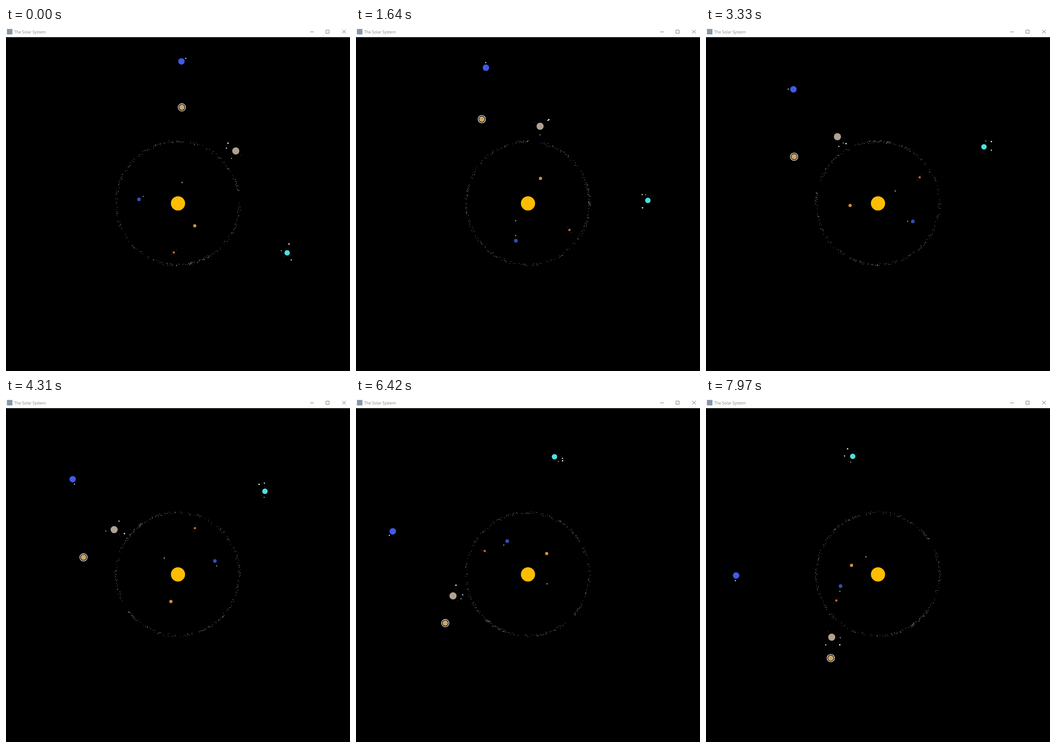
Recreate the animation shown at these times as an HTML page with a canvas. Size 750 by 747 pixels, loop 8000 ms.

```html
<!DOCTYPE html>
<html lang="en">
<head>
<meta charset="utf-8">
<title>The Solar System</title>
<style>
  html, body { margin: 0; width: 100%; height: 100%; overflow: hidden; background: #000; }
  canvas { display: block; }
</style>
</head>
<body>
<canvas id="stage" width="750" height="747"></canvas>
<script>
const ctx = document.getElementById('stage').getContext('2d');
const LOOP = 8000;
const STEP = 46.875;
const SUN = { x: 375, y: 382 };

// Moon fields: orbit radius, start angle, degrees per step, diameter, colour
const WHITE = '#fafafa', DIM = '#888';
const luna = [11.4, 34.5, 22.14, 2.1, '#e8e8e8'];
const planets = [
  { r: 46.4, start: 78.8, speed: 4.429, d: 3.4, color: '#7c7c7a' },
  { r: 61, start: -53.2, speed: 3.322, d: 7, color: '#cf9139' },
  { r: 85.5, start: 174.1, speed: 2.217, d: 8, color: '#3150b0', moons: [luna] },
  { r: 107.2, start: 265.1, speed: 1.775, d: 5, color: '#c96239', moons: [
    [7.6, 44, 17.71, 1, DIM],
    [7.6, 222, 17.71, 1, DIM]
  ] },
  { r: 170, start: 42.2, speed: 1.107, d: 15.5, color: '#b0a291', moons: [
    [24, 135, 17.71, 3.1, WHITE],
    [21.2, 163.5, 6.643, 2.5, WHITE],
    [18.6, 240.5, 11.08, 1.9, WHITE],
    [15.2, 320, 15.5, 1, DIM]
  ] },
  { r: 209.3, start: 87.7, speed: 0.884, d: 12, color: '#cca566', ring: 8.1 },
  { r: 262.1, start: -24.4, speed: 0.731, d: 11.8, color: '#4fdfe0', dx: -0.7, dy: -0.7, moons: [
    [19.8, 78.5, 4.43, 3, WHITE],
    [17.8, 299.5, 5.54, 2.6, WHITE],
    [13.2, 160, 8.857, 1.9, WHITE],
    [15.2, 163.5, 6.64, 1, DIM],
    [12, 230, 15.5, 1.1, DIM]
  ] },
  { r: 309.4, start: 88.6, speed: 0.5312, d: 14, color: '#4159ec',
    moons: [[...luna.slice(0, 3), 2.4, WHITE]] }
];

function seeded(seed) {
  return () => (seed = (seed * 16807) % 2147483647) / 2147483647;
}

function makeBelt() {
  const rnd = seeded(4711);
  const rocks = [];
  while (rocks.length < 300) {
    // A sparse stretch near 5 degrees, a crowded one near 290
    const u = rnd();
    const angle = u < 0.1 ? 278 + rnd() * 24 : rnd() * 360;
    const sparse = Math.abs(angle - 5) < 6;
    const rock = { angle, r: 131.5 + rnd() * 5.5, light: 0.4 + rnd() * 0.5 };
    if (!sparse) rocks.push(rock);
  }
  return rocks;
}
const belt = makeBelt();

function orbit(c, r, deg) {
  const a = deg * Math.PI / 180;
  return { x: c.x + r * Math.cos(a), y: c.y - r * Math.sin(a) };
}

function disc(p, d, color) {
  ctx.fillStyle = color;
  ctx.beginPath();
  ctx.arc(p.x, p.y, d / 2, 0, Math.PI * 2);
  ctx.fill();
}

function dot(p, color) {
  ctx.fillStyle = color;
  ctx.fillRect(Math.round(p.x - 0.5), Math.round(p.y - 0.5), 1, 1);
}

function drawPlanet(p, turn) {
  const pos = orbit({ x: SUN.x + (p.dx || 0), y: SUN.y + (p.dy || 0) }, p.r, p.start + p.speed * turn);
  disc(pos, p.d, p.color);
  if (p.ring) {
    ctx.strokeStyle = '#fff';
    ctx.lineWidth = 1.3;
    ctx.beginPath();
    ctx.arc(pos.x, pos.y, p.ring, 0, Math.PI * 2);
    ctx.stroke();
  }
  for (const [r, start, speed, d, color] of p.moons || []) {
    const m = orbit(pos, r, start + speed * turn);
    if (d < 1.5) dot(m, color);
    else disc(m, d, color);
  }
}

function drawTitleBar() {
  ctx.fillStyle = '#fffffd';
  ctx.fillRect(0, 0, 750, 20);
  ctx.fillStyle = '#8699ac';
  ctx.fillRect(2, 2, 12, 12);
  ctx.fillStyle = '#858585';
  ctx.font = '8.6px "Open Sans", "Noto Sans", sans-serif';
  ctx.textBaseline = 'alphabetic';
  ctx.fillText('The Solar System', 18, 11.5);
  ctx.strokeStyle = '#777';
  ctx.lineWidth = 1;
  ctx.beginPath();
  ctx.moveTo(663, 8.5);
  ctx.lineTo(671, 8.5);
  ctx.rect(697.5, 4.5, 7, 7);
  ctx.moveTo(733, 4);
  ctx.lineTo(741, 12);
  ctx.moveTo(741, 4);
  ctx.lineTo(733, 12);
  ctx.stroke();
}

function draw(ms) {
  const n = Math.floor((Math.floor(ms / 10) * 10 + 5) / STEP);
  const turn = n * (1 + 0.0001 * n); // the pace rises slightly
  ctx.fillStyle = '#000';
  ctx.fillRect(0, 0, 750, 747);
  drawTitleBar();
  for (const rock of belt) {
    const p = orbit({ x: 374.5, y: 381.5 }, rock.r, rock.angle + 2.214 * turn);
    dot(p, `rgba(255,255,255,${rock.light})`);
  }
  disc(SUN, 31, '#fdbd02');
  for (const p of planets) drawPlanet(p, turn);
}

const begin = performance.now();
function tick() {
  draw((performance.now() - begin) % LOOP);
  requestAnimationFrame(tick);
}
tick();
</script>
</body>
</html>
```
